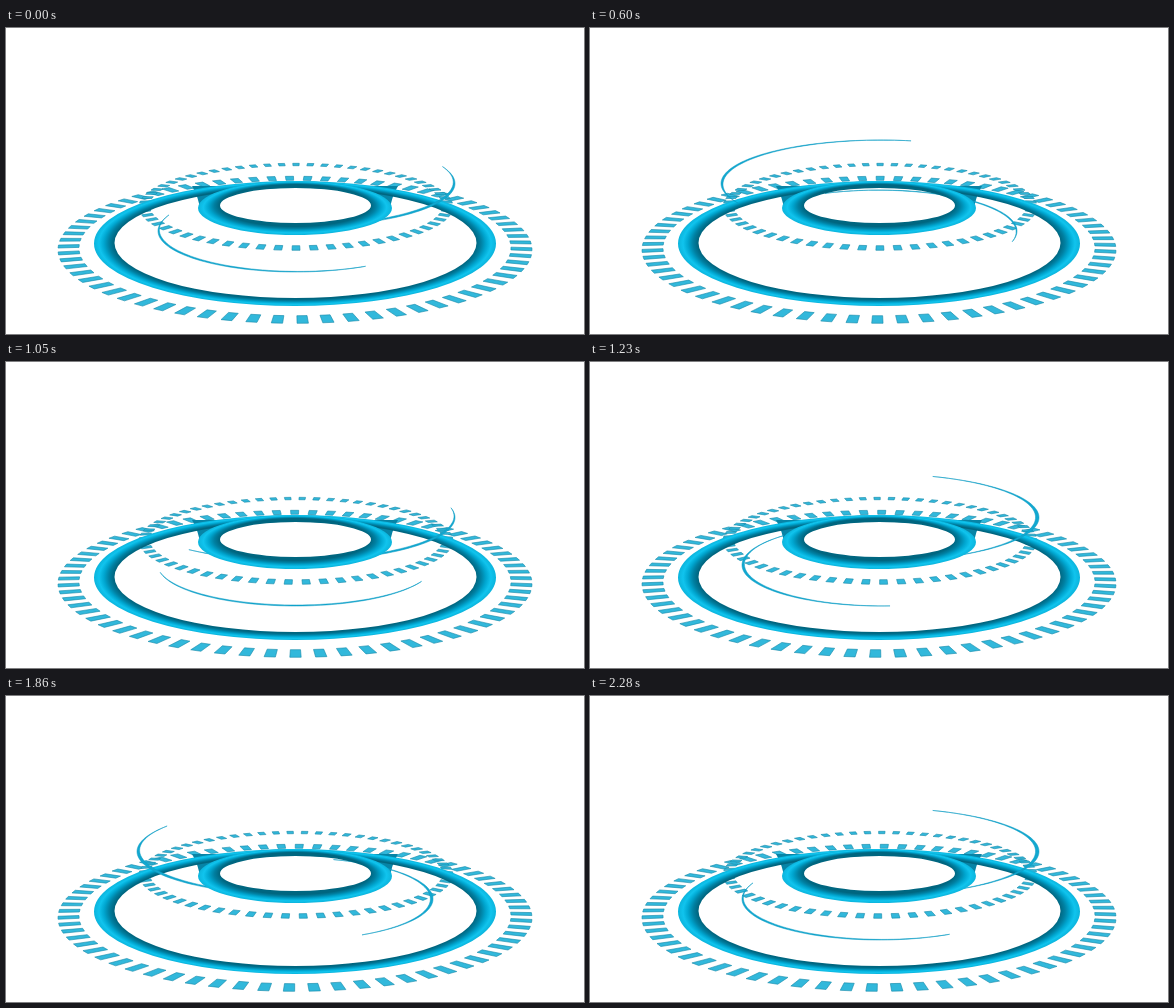
These frames come from a looping animation (578 by 306 pixels, 2.31 s). An HTML page with a canvas:

```html
<!DOCTYPE html>
<html>
<head>
<meta charset="utf-8">
<style>
  html, body { margin: 0; width: 100%; height: 100%; overflow: hidden; background: #fff; }
  canvas { display: block; }
</style>
</head>
<body>
<canvas id="stage" width="578" height="306"></canvas>
<script>
const ctx = document.getElementById('stage').getContext('2d');
const RAD = Math.PI / 180, LOOP = 2310, STEP = 30;

// Point on a circle lying on the floor; its outline on screen is the given ellipse.
function project({ x, y, rx, ry }, deg) {
  const k = rx / 1450, s = Math.sin(deg * RAD), d = 1 - k * s;
  return [x + rx * Math.sqrt(1 - k * k) * Math.cos(deg * RAD) / d, y + ry * (s - k) / d];
}

const mix = (a, b, f) => ({
  x: a.x + (b.x - a.x) * f, y: a.y + (b.y - a.y) * f,
  rx: a.rx + (b.rx - a.rx) * f, ry: a.ry + (b.ry - a.ry) * f
});

function polygon(points) {
  ctx.beginPath();
  points.forEach(p => ctx.lineTo(...p));
  ctx.closePath();
  ctx.fill();
  ctx.stroke();
}

function dashes(outer, inner, count, turn) {
  ctx.fillStyle = '#32b8db';
  ctx.strokeStyle = '#1488a8';
  ctx.lineWidth = 0.6;
  const pitch = 360 / count, half = pitch * 0.22;
  for (let i = 0; i < count; i++) {
    const a = 90 + (i + turn) * pitch;
    polygon([project(outer, a - half), project(outer, a + half),
             project(inner, a + half), project(inner, a - half)]);
  }
}

// Crescent that is thickest in its middle.
function sweep(outer, inner, middle, length) {
  const edge = [], back = [];
  for (let f = 0; f <= 1.001; f += 1 / 60) {
    const a = middle + (f - 0.5) * length;
    edge.push(project(outer, a));
    back.unshift(project(mix(outer, inner, Math.sin(Math.PI * Math.min(f, 1))), a));
  }
  ctx.fillStyle = '#12a8d0';
  ctx.strokeStyle = '#0b9ac2';
  ctx.lineWidth = 0.5;
  polygon(edge.concat(back));
}

// Ring shaded from a dark hole edge to a bright outer edge.
function band(outer, hole) {
  ctx.save();
  ctx.beginPath();
  for (const e of [outer, hole]) {
    ctx.moveTo(e.x + e.rx, e.y);
    ctx.ellipse(e.x, e.y, e.rx, e.ry, 0, 0, 2 * Math.PI);
  }
  ctx.translate(outer.x, outer.y);
  ctx.scale(outer.rx, outer.ry);
  const paint = ctx.createRadialGradient(
    0, (hole.y - outer.y) / outer.ry, hole.rx / outer.rx, 0, 0, 1);
  ['#006680', '#0080a2', '#00a6d0', '#10c4ee', '#0cb4dc']
    .forEach((color, i) => paint.addColorStop(i / 4, color));
  ctx.fillStyle = paint;
  ctx.fill('evenodd');
  ctx.restore();
}

// Small fillet where the inner band meets the outer one.
function fin(side) {
  const x = d => 289 + side * d;
  ctx.fillStyle = '#0784a6';
  ctx.beginPath();
  ctx.moveTo(x(103), 158);
  ctx.quadraticCurveTo(x(96), 170, x(95), 182);
  ctx.quadraticCurveTo(x(84), 166, x(66), 158);
  ctx.fill();
}

const ellipse = (x, y, rx, ry) => ({ x, y, rx, ry });
const WIDE = [ellipse(289, 221.8, 237, 73.5), ellipse(289, 220, 216, 67.7)];
const NARROW = [ellipse(290, 178.8, 157, 43.5), ellipse(290, 177.7, 146.5, 40)];
const HIGH = [ellipse(290, 155.5, 159, 43.5), ellipse(290, 155.1, 155.5, 42.6)];
const LOW = [ellipse(289.5, 203, 137.5, 41), ellipse(289.5, 202.7, 134.8, 40.3)];

function draw(now) {
  const n = Math.max(0, Math.floor(now % LOOP / STEP) - 1);
  ctx.clearRect(0, 0, 578, 306);
  dashes(...WIDE, 68, -0.3 - n * 0.1388);
  dashes(...NARROW, 60, -n * 0.105);
  fin(-1);
  fin(1);
  band(ellipse(289, 215.5, 201, 62.5), ellipse(289.5, 215, 181, 55));
  sweep(...LOW, 130 + 9.6 * n, 136);
  sweep(...HIGH, 50.5 - 360 / 35 * n, 135);
  band(ellipse(289, 180, 97, 27), ellipse(289.5, 177.5, 75.5, 17.5));
  requestAnimationFrame(draw);
}
requestAnimationFrame(draw);
</script>
</body>
</html>
```
